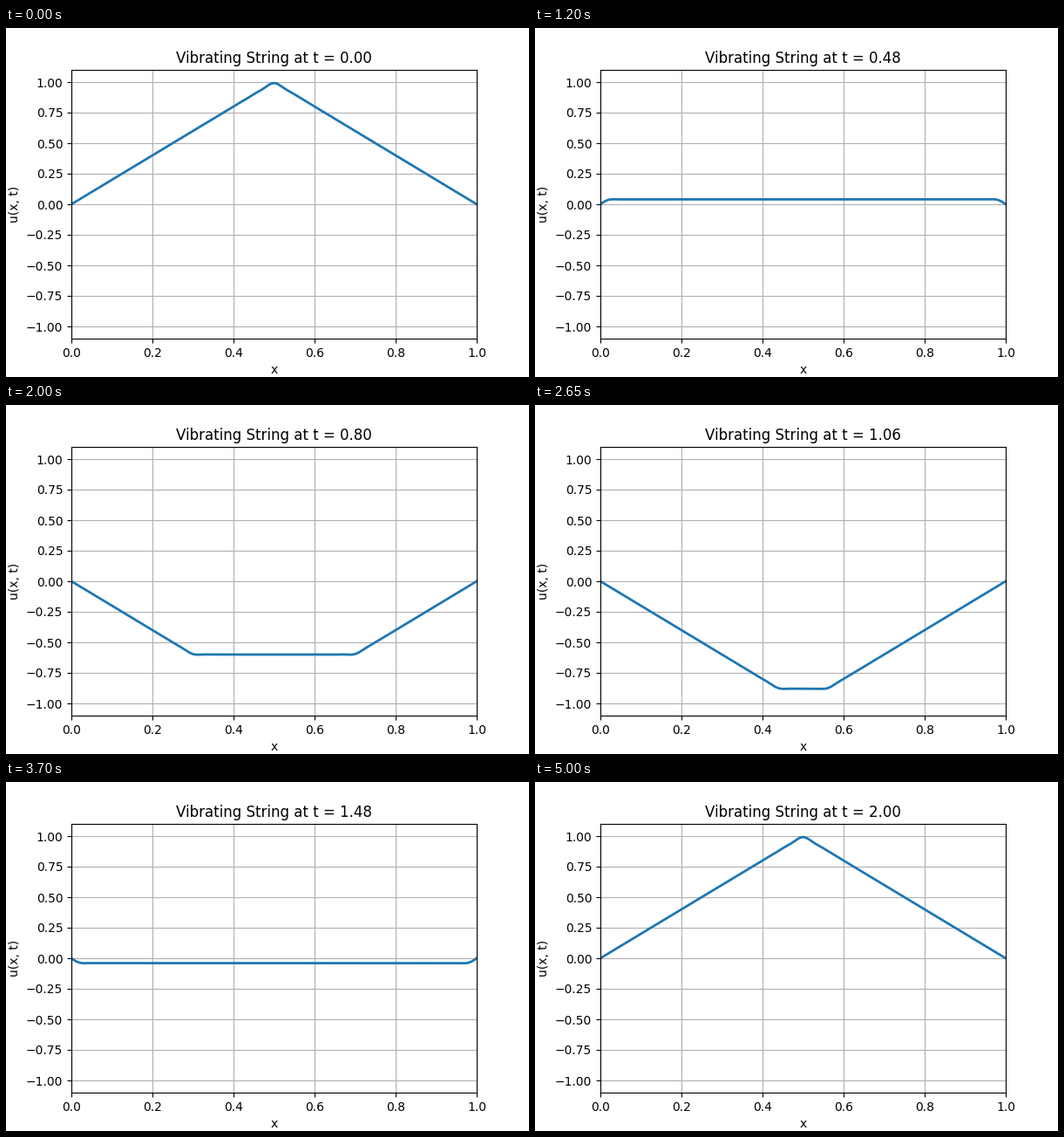
A matplotlib script that plays this animation: 600 by 400 pixels, repeating every 5050 ms.

```python
import numpy as np
import matplotlib.pyplot as plt
from matplotlib.animation import FuncAnimation

LENGTH = 1.0
SPEED = 1.0
TERMS = 50
FRAMES = 101
STEP = 0.02

x = np.linspace(0, LENGTH, 201)
n = np.arange(1, TERMS + 1)
k = n * np.pi / LENGTH
coeffs = 8 / (n * np.pi) ** 2 * np.sin(n * np.pi / 2)
modes = np.sin(np.outer(x, k))


def displacement(t):
    """Plucked string as a truncated Fourier series."""
    return modes @ (coeffs * np.cos(k * SPEED * t))


fig, ax = plt.subplots(figsize=(6, 4), dpi=100)
line, = ax.plot(x, displacement(0), lw=2)
ax.set_xlim(0, LENGTH)
ax.set_ylim(-1.1, 1.1)
ax.set_xlabel("x")
ax.set_ylabel("u(x, t)")
ax.grid(True)
title = ax.set_title("Vibrating String at t = 0.00")


def update(frame):
    t = frame * STEP
    line.set_ydata(displacement(t))
    title.set_text(f"Vibrating String at t = {t:.2f}")
    return line, title


anim = FuncAnimation(fig, update, frames=FRAMES, interval=50,
                     repeat=True, repeat_delay=0)
plt.show()
```
